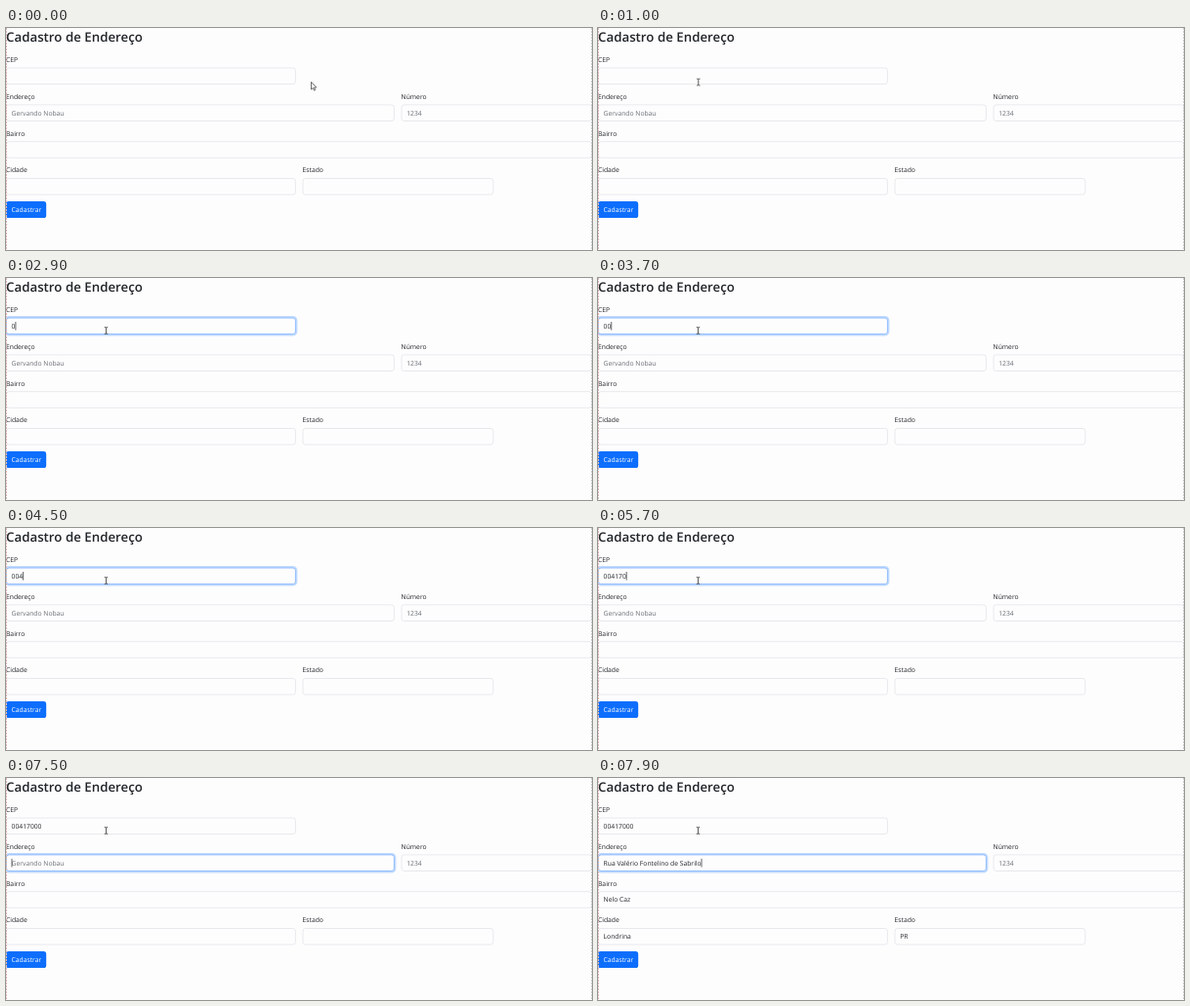
Write an HTML page that moves like this. It is 600 px wide and 228 px high and loops after 8 s.

```html
<!DOCTYPE html>
<html lang="pt-BR">
<head>
<meta charset="utf-8">
<title>Cadastro de Endereço</title>
<style>
  html, body { margin: 0; width: 100%; height: 100%; overflow: hidden; background: #fefdfe; }
  svg { display: block; width: 600px; height: 228px; }
  text { font: 6.75px "Open Sans", "Noto Sans", sans-serif; fill: #212529; text-rendering: geometricPrecision; }
  .title { font-size: 13.3px; font-weight: 600; }
  .hint { fill: #686e74; }
  .button { fill: #fff; }
</style>
</head>
<body>
<svg id="stage" viewBox="0 0 600 228" xmlns="http://www.w3.org/2000/svg">
  <rect width="600" height="228" fill="#fefdfe"/>
  <text class="title" x="0" y="13.6">Cadastro de Endereço</text>
  <g id="form"></g>
  <rect x="0" y="178" width="41.2" height="17.1" rx="2.7" fill="#0d6efd"/>
  <text class="button" x="5.6" y="189.1">Cadastrar</text>
  <path d="M.5 0V228" stroke="#dfb8b8" stroke-dasharray="2 1"/>
  <path d="M599.5 0V228" stroke="#cfcfd1" stroke-dasharray="2 1"/>
  <path id="caret" stroke="#212529" stroke-width=".7"/>
  <path id="arrow" d="M0 0V7.6L1.8 6L3 8.7L4.2 8.2L3 5.6H5.3Z" fill="#fff" stroke="#333" stroke-width=".7"/>
  <path id="beam" d="M-1.7 -3.4H-.4L0 -3L.4 -3.4H1.7M0 -3V3M-1.7 3.4H-.4L0 3L.4 3.4H1.7" fill="none" stroke="#333" stroke-width=".8"/>
</svg>
<script>
const LOOP = 8000, STEP = 100, BLINK = 530, FADE = 150;
const CLICK = 1200, TAB = 7300, FILL = 7600;
const CODE = "00417000";
const KEYS = [2800, 3500, 4100, 4800, 5200, 5600, 5900, 6200];

const $ = id => document.getElementById(id);
const clamp = v => Math.min(1, Math.max(0, v));
const ease = v => v * v * (3 - 2 * v);
const progress = (t, from, to) => ease(clamp((t - from) / (to - from)));
const mix = (a, b, k) => a + (b - a) * k;

function add(tag, attrs, content = "") {
  const node = document.createElementNS("http://www.w3.org/2000/svg", tag);
  for (const key in attrs) node.setAttribute(key, attrs[key]);
  node.textContent = content;
  $("form").append(node);
  return node;
}

function field(label, x, y, width, hint = "") {
  add("text", { x, y: y - 6.2 }, label);
  const box = { x: x + .4, y, width: width - .6, height: 16.6, rx: 2.6 };
  add("rect", { ...box, fill: "#fefdfe", stroke: "#e2e4e8", "stroke-width": .8 });
  const ring = add("g", { opacity: 0 });
  ring.append(
    add("rect", { ...box, fill: "none", stroke: "#c2dbfe", "stroke-width": 4 }),
    add("rect", { ...box, fill: "#fefdfe", stroke: "#86b7fe", "stroke-width": .9 })
  );
  const text = add("text", { x: x + 5.6, y: y + 10.7 });
  return { x, y, hint, ring, text };
}

const cep = field("CEP", 0, 41, 296.6);
const street = field("Endereço", 0, 78.9, 397.6, "Gervando Nobau");
const number = field("Número", 404.6, 78.9, 195.4, "1234");
const district = field("Bairro", 0, 116.7, 600);
const city = field("Cidade", 0, 154.5, 296.6);
const state = field("Estado", 303.6, 154.5, 195.4);

function setValue(f, value) {
  f.text.textContent = value || f.hint;
  f.text.setAttribute("class", value ? "" : "hint");
}

function drawCaret(t) {
  const active = t >= TAB ? street : cep;
  const lastEvent = [CLICK, ...KEYS, TAB, FILL].filter(e => e <= t).pop();
  const visible = t >= CLICK && (t - lastEvent) % (2 * BLINK) < BLINK;
  const length = active.text.getAttribute("class") ? 0 : active.text.getComputedTextLength();
  $("caret").setAttribute("d", visible ? `M${active.x + 6 + length} ${active.y + 4}v8.6` : "");
}

function drawPointer(t) {
  const travel = progress(t, 100, 900), settle = progress(t, 1000, 1300);
  const x = mix(312.5, 102.8, travel) - .3 * settle;
  const y = mix(55.5, 55.6, travel) - 1.6 * settle;
  const overField = x < 296.6;
  for (const [id, shown] of [["arrow", !overField], ["beam", overField]]) {
    $(id).setAttribute("transform", `translate(${x} ${y})`);
    $(id).setAttribute("visibility", shown ? "visible" : "hidden");
  }
}

function draw(t) {
  const filled = t >= FILL;
  setValue(cep, CODE.slice(0, KEYS.filter(k => k <= t).length));
  setValue(street, filled && "Rua Valério Fontelino de Sabrilo");
  setValue(number, "");
  setValue(district, filled && "Nelo Caz");
  setValue(city, filled && "Londrina");
  setValue(state, filled && "PR");

  const moved = progress(t, TAB, TAB + FADE);
  cep.ring.setAttribute("opacity", progress(t, CLICK, CLICK + FADE) * (1 - moved));
  street.ring.setAttribute("opacity", moved);
  drawCaret(t);
  drawPointer(t);
}

const start = performance.now();
function tick() {
  const t = (performance.now() - start) % LOOP;
  draw(Math.floor(t / STEP) * STEP);
  requestAnimationFrame(tick);
}
tick();
</script>
</body>
</html>
```
